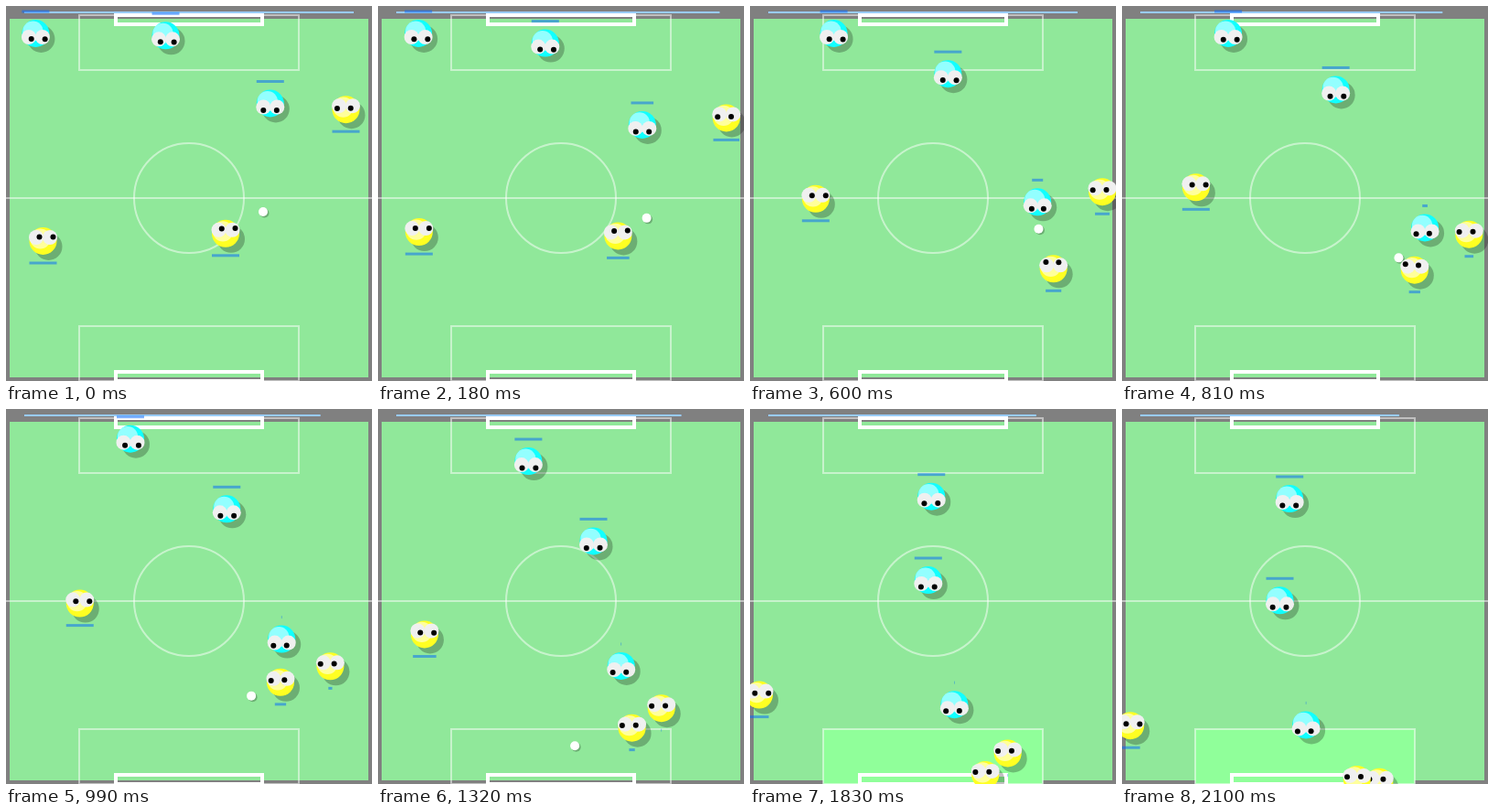
Write an HTML page that moves like this. It is 400x410 px and loops after 2130 ms.

```html
<!DOCTYPE html>
<html lang="en">
<head>
<meta charset="utf-8">
<title>Football</title>
<style>
html, body { margin: 0; width: 100%; height: 100%; overflow: hidden; background: #808080; }
svg { display: block; width: 400px; height: 410px; }
</style>
</head>
<body>
<svg id="stage" viewBox="0 0 400 410"></svg>
<script>
const LOOP = 2130, STEP = 30;
const SPEED = .1167;   // running speed, px per ms; sprinting doubles it
const INERTIA = 93;    // ms a player needs to take up a new heading
const ROLL = 1000;     // ms constant of the ball's friction
const DRAIN = .03;     // stamina bar px lost per ms of sprint
const RIGHT_WALL = 385, GOAL_LINE = 410, GAZE = 3.5;

// Each run lists "time:compass heading"; "!" is a sprint, "-" a stop.
const players = [
  player("cyan", 32.4, 30, "0:E 900:SE 1726:W 1930:-"),
  player("cyan", 174.5, 32.3, "0:SE 825:S 1158:SW"),
  player("cyan", 288.8, 106.5, "0:S! 360:SE! 705:W! 905:SW! 990:SW"),
  player("yellow", 371.5, 113.2, "0:SE 130:SE! 260:S! 716:SW! 1130:SW 1560:S"),
  player("yellow", 240, 248.8,
    "0:E! 120:SE! 360:E! 430:E 620:W! 780:SW 990:SW! 1080:S! 1190:S 1320:SW 1560:S 1765:-"),
  player("yellow", 40.5, 257,
    "0:N 60:NE 460:N 600:NE 715:S 915:SW 1170:SW! 1360:SW 1620:S! 1730:S")
];
const kicks = [
  { time: 0, vx: .0764, vy: .0416 },
  { time: 690, vx: -.147, vy: .262 },
  { time: 840, vx: -.219, vy: .2255 }
];

function player(team, x, y, run) {
  const legs = run.split(" ").map(leg => {
    const [time, heading] = leg.split(":");
    const has = c => heading.includes(c);
    const dx = has("E") - has("W"), dy = has("S") - has("N");
    const sprint = has("!");
    const speed = SPEED * (sprint ? 2 : 1) / (Math.hypot(dx, dy) || 1);
    return { time: +time, vx: dx * speed, vy: dy * speed, sprint };
  });
  return { team, x, y, legs, side: team === "cyan" ? 1 : -1 };
}

// Time spent in stage i of a timed list
function span(list, i, t) {
  const end = i + 1 < list.length ? list[i + 1].time : LOOP;
  return Math.max(0, Math.min(t, end) - list[i].time);
}

// The velocity eases exponentially towards each heading.
function runTo(p, t) {
  let { x, y } = p, vx = 0, vy = 0, stamina = 30;
  p.legs.forEach((leg, i) => {
    const dt = span(p.legs, i, t), fade = Math.exp(-dt / INERTIA);
    const lag = INERTIA * (1 - fade);
    x = Math.min(RIGHT_WALL, x + leg.vx * dt + (vx - leg.vx) * lag);
    y += leg.vy * dt + (vy - leg.vy) * lag;
    vx = leg.vx + (vx - leg.vx) * fade;
    vy = leg.vy + (vy - leg.vy) * fade;
    if (leg.sprint) stamina -= dt * DRAIN;
  });
  return { x, y, stamina: Math.max(.7, stamina) };
}

function rollTo(t) {
  let x = 281, y = 225;
  kicks.forEach((kick, i) => {
    const reach = ROLL * (1 - Math.exp(-span(kicks, i, t) / ROLL));
    x += kick.vx * reach;
    y += kick.vy * reach;
  });
  return { x, y };
}

const svg = document.getElementById("stage");
function set(el, attrs) {
  for (const k in attrs) el.setAttribute(k, attrs[k]);
}
function add(parent, tag, attrs = {}) {
  const el = document.createElementNS("http://www.w3.org/2000/svg", tag);
  set(el, attrs);
  return parent.appendChild(el);
}
const rect = (parent, x, y, width, height, attrs) =>
  add(parent, "rect", { x, y, width, height, ...attrs });
const circle = (parent, cx, cy, r, fill, attrs) =>
  add(parent, "circle", { cx, cy, r, fill, ...attrs });
const move = (el, x, y) =>
  el.setAttribute("transform", `translate(${x.toFixed(2)} ${y.toFixed(2)})`);

// Pitch
rect(svg, 0, 0, 400, 410, { fill: "#808080" });
rect(svg, 4, 14, 392, 392, { fill: "#90e89a" });
const flash = rect(svg, 80, 350, 240, 60, { fill: "#90ff9a" });
const lines = add(svg, "g", { fill: "none", stroke: "#fff", "stroke-opacity": .5, "stroke-width": 2 });
add(lines, "path", { d: "M0 210H400" });
circle(lines, 200, 210, 60, "none");
for (const y of [10, 350]) rect(lines, 80, y, 240, 60);
for (const y of [10, 400]) rect(svg, 120, y, 160, 10, { fill: "none", stroke: "#fff", "stroke-width": 4 });
const clock = rect(svg, 20, 6, 360, 2, { fill: "#99ccff" });

// Moving parts
const shadows = add(svg, "g", { "fill-opacity": .25 });
const bodies = add(svg, "g");
const bars = add(svg, "g", { fill: "#06f", "fill-opacity": .5 });
for (const p of players) {
  p.shadow = circle(shadows, 6, 6, 15, "#000");
  p.body = add(bodies, "g");
  circle(p.body, 0, 0, 15, p.team === "cyan" ? "#1ff" : "#ff2");
  circle(p.body, -3, -2.5, 11.1, "#fff", { "fill-opacity": .55 });
  p.eyes = [-7.5, 7.5].map(x => ({ x, y: 4 * p.side }));
  for (const eye of p.eyes) circle(p.body, eye.x, eye.y, 8, "#f0f0f0");
  for (const eye of p.eyes) eye.pupil = circle(p.body, 0, 0, 3, "#000");
  p.bar = rect(bars, 0, 0, 30, 3);
}
const ballShadow = circle(shadows, 1.5, 1.5, 5, "#000");
const ballDot = circle(svg, 0, 0, 5, "#fff");

function draw(t) {
  const ball = rollTo(t);
  move(ballDot, ball.x, ball.y);
  move(ballShadow, ball.x, ball.y);
  set(clock, { width: 360 - t * .0367 });
  set(flash, { visibility: ball.y > GOAL_LINE ? "visible" : "hidden" });
  for (const p of players) {
    const { x, y, stamina } = runTo(p, t);
    move(p.shadow, x, y);
    move(p.body, x, y);
    for (const eye of p.eyes) {
      const angle = Math.atan2(ball.y - y - eye.y, ball.x - x - eye.x);
      move(eye.pupil, eye.x + GAZE * Math.cos(angle), eye.y + GAZE * Math.sin(angle));
    }
    set(p.bar, { x: x - stamina / 2, y: y - 24 * p.side - 1.5, width: stamina });
  }
}

const start = performance.now();
function tick() {
  const t = (performance.now() - start) % LOOP;
  draw(Math.floor(t / STEP) * STEP);
  requestAnimationFrame(tick);
}
tick();
</script>
</body>
</html>
```
